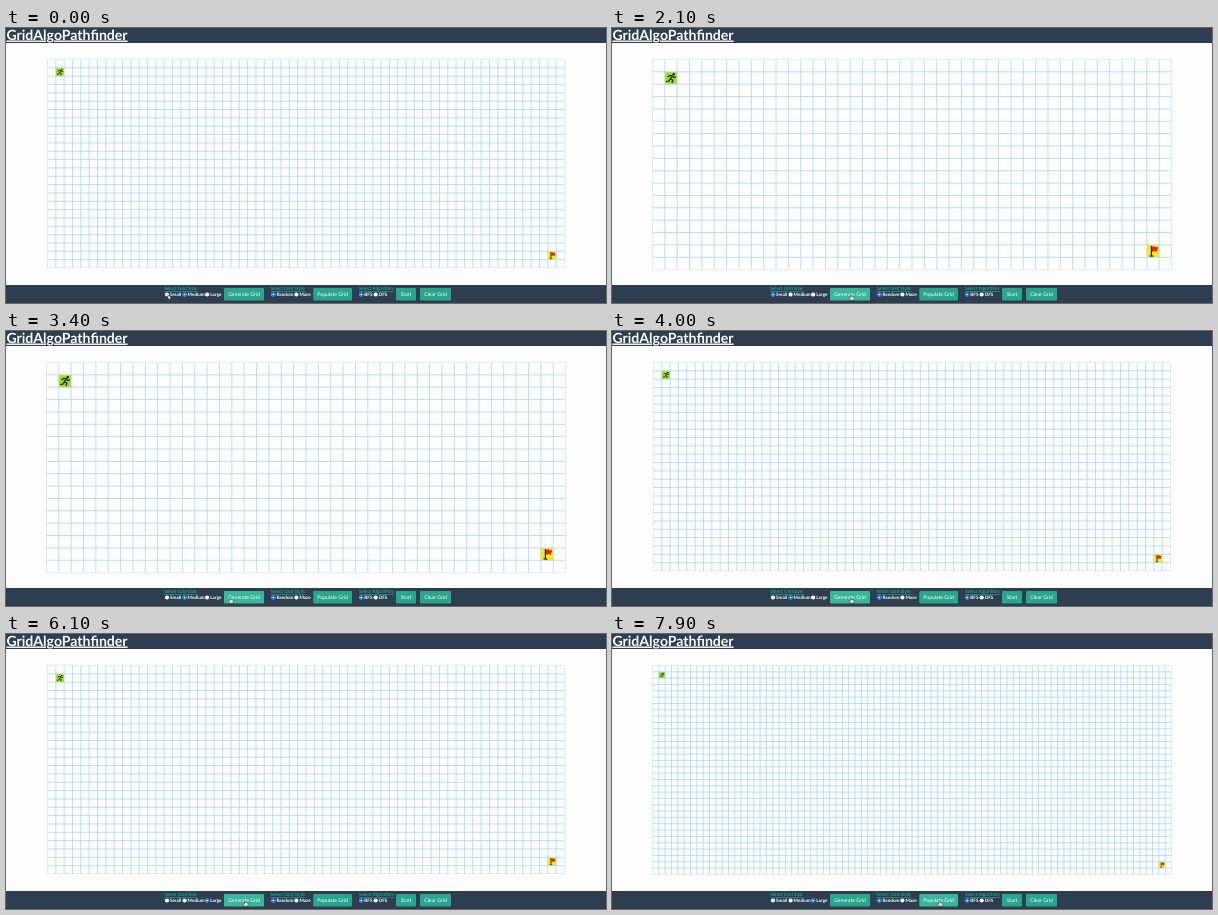
An HTML page for the animation above (8 s loop, 600 by 275 pixels).

```html
<!DOCTYPE html>
<html lang="en">
<head>
<meta charset="utf-8">
<title>GridAlgoPathfinder</title>
<style>
  html, body { margin: 0; width: 100%; height: 100%; overflow: hidden; background: #fdfdfe; }
  #stage { display: block; width: 100vw; height: 100vh; }
  text { font-family: Lato, sans-serif; fill: #fff; text-rendering: geometricPrecision; }
  .title, .label { text-decoration: underline; text-decoration-skip-ink: none; }
  .title { font-size: 14.1px; font-weight: 700; }
  .label { font-size: 4.7px; fill: #1cc5a3; }
  .option { font-size: 4.65px; font-weight: 700; }
  .caption { font-size: 5.1px; text-anchor: middle; }
  .bar { fill: #2c3e50; }
  .button { fill: #29a68d; }
  .button.hover { fill: #38b79e; }
</style>
</head>
<body>
<svg id="stage" viewBox="0 0 600 275">
  <defs>
    <g id="runner">
      <rect width="1" height="1" fill="#a8e01c"/>
      <circle cx=".72" cy=".2" r=".1" fill="#17251f"/>
      <path d="M.62 .31 .44 .57M.22 .42 .4 .29 .62 .33 .72 .47 .9 .4M.44 .57 .65 .66 .59 .9M.44 .57 .34 .75 .1 .77"
        fill="none" stroke="#1c3038" stroke-width=".11" stroke-linejoin="round"/>
    </g>
    <g id="flag">
      <rect width="1" height="1" fill="#fbea10"/>
      <path d="M.4 .14 .62 .1 .72 .2 .92 .17 .82 .56 .62 .5 .43 .57Z" fill="#e32619"/>
      <path d="M.37 .08V.93M.22 .91H.54" stroke="#222015" stroke-width=".1"/>
    </g>
  </defs>
  <rect class="bar" width="600" height="15"/>
  <rect class="bar" y="257" width="600" height="18"/>
  <text class="title" x=".4" y="11.5">GridAlgoPathfinder</text>
</svg>
<script>
const LOOP = 8000, TRAVEL = 600, REST = 100;
const stage = document.getElementById('stage');

function add(tag, attributes, parent = stage) {
  const node = document.createElementNS('http://www.w3.org/2000/svg', tag);
  for (const [key, value] of Object.entries(attributes)) node.setAttribute(key, value);
  return parent.appendChild(node);
}

function addText(className, x, y, content) {
  add('text', { class: className, x, y }).textContent = content;
}

const show = (node, visible) => node.setAttribute('visibility', visible ? 'visible' : 'hidden');

// The nested svg clips the outer lines to half their weight, like bordered cells.
function makeGrid(cell, columns, rows) {
  const width = cell * columns, height = cell * rows;
  const grid = add('svg', { x: 300 - width / 2, y: 31.5, width, height });
  let d = '';
  for (let i = 0; i <= columns; i++) d += `M${i * cell} 0v${height}`;
  for (let i = 0; i <= rows; i++) d += `M0 ${i * cell}h${width}`;
  const place = (icon, column, row) => add('use', {
    href: icon, transform: `scale(${cell}) translate(${column} ${row})`
  }, grid);
  add('rect', { width, height, fill: '#fff' }, grid);
  place('#runner', 1, 1);
  place('#flag', columns - 2, rows - 2);
  add('path', { d, stroke: '#abd7f3', 'stroke-width': .83 }, grid);
  return grid;
}

function makeRadio(x, label, checked = false) {
  add('circle', { cx: x, cy: 266.5, r: 2.1, fill: '#fff' });
  const dot = add('circle', { cx: x, cy: 266.5, r: 1.5, fill: '#fff', stroke: '#1670e8', 'stroke-width': 1.3 });
  addText('option', x + 3, 268.1, label);
  show(dot, checked);
  return { x, dot };
}

function makeButton(left, width, label) {
  const node = add('rect', { class: 'button', x: left, y: 260, width, height: 12.6, rx: 1 });
  const x = left + width / 2;
  addText('caption', x, 268, label);
  return { x, node, contains: px => Math.abs(px - x) <= width / 2 };
}

const grids = [makeGrid(12.36, 42, 17), makeGrid(8.34, 62, 25), makeGrid(6.33, 82, 33)];

addText('label', 158.3, 262.4, 'Select Grid Size:');
const sizes = [makeRadio(161, 'Small'), makeRadio(178.6, 'Medium'), makeRadio(201.2, 'Large')];
const [small, medium, large] = sizes;
const generate = makeButton(218, 40, 'Generate Grid');

addText('label', 264.5, 262.4, 'Select Grid Style:');
makeRadio(267.4, 'Random', true);
makeRadio(290.4, 'Maze');
const populate = makeButton(307.3, 38.7, 'Populate Grid');

addText('label', 353, 262.4, 'Select Algorithm:');
makeRadio(355.3, 'BFS', true);
makeRadio(369.7, 'DFS');
const buttons = [generate, populate, makeButton(390, 20, 'Start'), makeButton(414, 31, 'Clear Grid')];

const cursor = add('g', { fill: '#fff', stroke: '#18222b', 'stroke-width': .45, 'stroke-linejoin': 'round' });
const arrow = add('path', { d: 'M0 0V4.6L1.1 3.7 1.9 5.3 2.7 4.9 2 3.4H3.4Z' }, cursor);
const hand = add('path', { d: 'M-.5 .4Q0-.3 .5 .4V2L2.7 2.5Q3.2 2.7 3 3.6L2.5 5.4H-.4L-1.8 3.4Q-1.7 2.5-.5 3.2Z' }, cursor);

const clicks = [
  { time: 1000, control: small },
  { time: 2100, control: generate },
  { time: 3100, control: medium },
  { time: 3800, control: generate },
  { time: 4900, control: large },
  { time: 6200, control: generate },
  { time: 7900, control: populate }
];

// Replays the clicks up to t; the pointer glides to each control just before its click.
function stateAt(t) {
  let x = small.x + 1, selected = medium, shown = medium;
  for (const { time, control } of clicks) {
    const progress = Math.min(1, Math.max(0, (t - time + REST + TRAVEL) / TRAVEL));
    x += (control.x + 1 - x) * (1 - (1 - progress) ** 2);
    if (t < time) continue;
    if (sizes.includes(control)) selected = control;
    if (control === generate) shown = selected;
  }
  return { x, selected, shown };
}

function draw(t) {
  const { x, selected, shown } = stateAt(t);
  sizes.forEach((size, i) => {
    show(size.dot, size === selected);
    grids[i].style.display = size === shown ? '' : 'none';
  });
  for (const button of buttons) button.node.classList.toggle('hover', button.contains(x));
  const overButton = buttons.some(button => button.contains(x));
  show(hand, overButton);
  show(arrow, !overButton);
  cursor.setAttribute('transform', `translate(${x} 266.7)`);
}

const start = performance.now();
function tick() {
  draw((performance.now() - start) % LOOP);
  requestAnimationFrame(tick);
}
tick();
</script>
</body>
</html>
```
